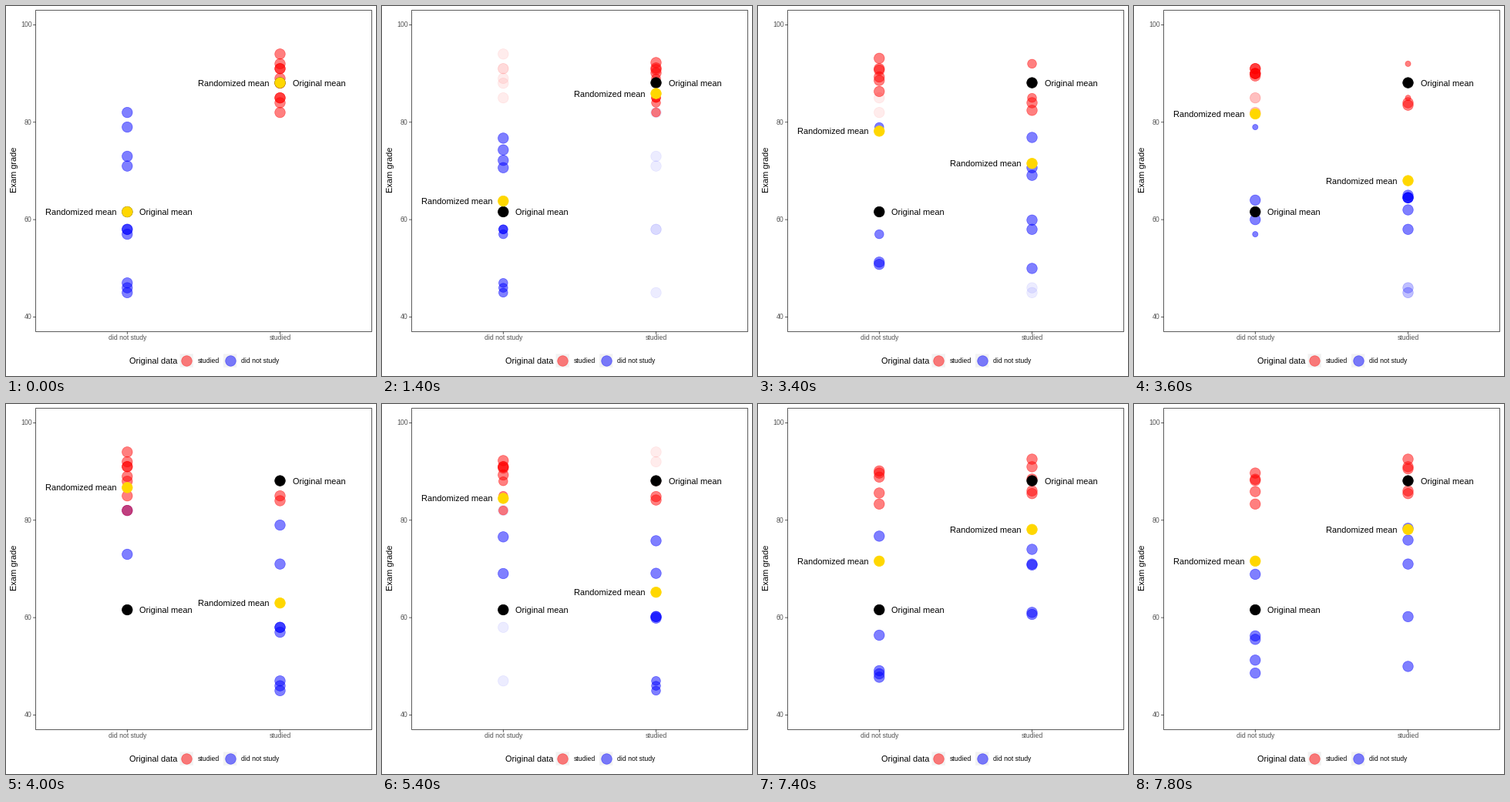
A matplotlib script that plays this animation: 480x480 px, repeating every 8 s.

```python
import math
import matplotlib as mpl
import matplotlib.pyplot as plt
from matplotlib.animation import FuncAnimation
from matplotlib.patches import Rectangle

mpl.rcParams.update({
    "font.family": "Liberation Sans",
    "text.hinting": "default",
    "text.hinting_factor": 8,
})

W = H = 480
LEFT, RIGHT, TOP, BOTTOM = 38.5, 474.5, 5.5, 422.5
COL_X = (157.3, 355.5)
RED, BLUE = (1, 0, 0), (0, 0, 1)
BLACK, GOLD = (0, 0, 0), (1, 215 / 255, 0)
SIZE, EDGE = 6, 0.71
HOLD, CYCLE = 7, 10

STUDIED = [82, 84, 85, 85, 88, 89, 91, 91, 92, 94]
NOT_STUDIED = [45, 46, 47, 57, 58, 58, 71, 73, 79, 82]
# Per shuffle, the students who keep their column: (studied, not studied).
KEPT = [
    (STUDIED, NOT_STUDIED),
    ([82, 84, 85, 92], [46, 47, 57, 79]),
    ([84, 85], [73, 82]),
    ([84, 85, 88, 92, 94], [45, 46, 47, 58, 82]),
    ([84, 85, 91, 92, 94], [46, 47, 57, 58, 73]),
]
GROUPS = ((0, RED), (0, BLUE), (1, RED), (1, BLUE))


def without(pool, taken):
    rest = list(pool)
    for grade in taken:
        rest.remove(grade)
    return rest


def arrange(k):
    """Grades per group; the sort direction flips so that points cross over."""
    red, blue = KEPT[k]
    groups = (without(STUDIED, red), blue, red, without(NOT_STUDIED, blue))
    return [sorted(g, reverse=k % 2 == 0) for g in groups]


STATES = [arrange(k) for k in range(len(KEPT))]


def y_px(grade):
    return 24.4 + (100 - grade) * 6.318


def diameter(size):
    return 0.75 * (size * 2.845 + 0.945)


def mean(state, col):
    grades = state[2 * col] + state[2 * col + 1]
    return sum(grades) / len(grades)


def mix(a, b, t):
    return a + (b - a) * t


def ease(t):
    return (1 - math.cos(math.pi * t)) / 2


def cloud(a, b, t):
    """Points as (order, x, y, size, colour, alpha) between two states."""
    pts = []
    for (col, color), old, new in zip(GROUPS, a, b):
        for i in range(max(len(old), len(new))):
            size, alpha = SIZE, 0.5
            if i < len(old) and i < len(new):
                grade = mix(old[i], new[i], t)
            elif i < len(old):
                grade, size = old[i], SIZE * (1 - t)
            else:
                grade, alpha = new[i], 0.5 * t
            pts.append((i, COL_X[col], y_px(grade), size, color, alpha))
    return sorted(pts, key=lambda p: p[0])


fig = plt.figure(figsize=(W / 72, H / 72), dpi=72, facecolor="white")
ax = fig.add_axes([0, 0, 1, 1])
ax.set_xlim(0, W)
ax.set_ylim(H, 0)
ax.axis("off")


def label(x, y, s, size=11, color="black", ha="left", va="baseline", **kw):
    return ax.text(x, y, s, fontsize=size, color=color, ha=ha, va=va, **kw)


def dots(pts, z):
    """One collection from (x, y, size, colour, alpha) tuples."""
    rgba = [(*p[3], p[4]) for p in pts]
    sc = ax.scatter([p[0] for p in pts], [p[1] for p in pts],
                    s=[diameter(p[2]) ** 2 for p in pts], facecolors=rgba,
                    edgecolors=rgba, linewidths=EDGE, zorder=z)
    sc.set_snap(False)
    return sc


def draw_frame():
    line = dict(color="#333333", lw=0.8, snap=False)
    ax.add_patch(Rectangle((LEFT, TOP), RIGHT - LEFT, BOTTOM - TOP,
                           fill=False, zorder=6, **line))
    for g in range(40, 101, 20):
        y = y_px(g)
        ax.plot([LEFT - 3, LEFT], [y, y], **line)
        label(33.5, y + 3, str(g), 8.8, "#4D4D4D", "right")
    for x, s in zip(COL_X, ("did not study", "studied")):
        ax.plot([x, x], [BOTTOM, BOTTOM + 3], **line)
        label(x, 433, s, 8.8, "#4D4D4D", "center")
    label(16, 212.5, "Exam grade", ha="right", va="center", rotation=90)


def draw_legend():
    label(160, 464, "Original data")
    for x, color, s in ((234.2, RED, "studied"),
                        (290.6, BLUE, "did not study")):
        ax.add_patch(Rectangle((x - 8.6, 451.4), 17.3, 17.3, fc="#F2F2F2",
                               ec="none", zorder=1, snap=False))
        dots([(x, 460, SIZE, color, 0.5)], 2)
        label(x + 14.4, 463, s, 8.8)


draw_frame()
draw_legend()
points = dots([], 3)
home = [y_px(mean(STATES[0], c)) for c in (0, 1)]
dots([(x, y, SIZE, BLACK, 1) for x, y in zip(COL_X, home)], 4)
mean_dots = dots([(x, y, SIZE, GOLD, 1) for x, y in zip(COL_X, home)], 5)
mean_labels = []
for x, y in zip(COL_X, home):
    label(x + 16, y + 4, "Original mean", zorder=5)
    mean_labels.append(label(x - 14, y + 4, "Randomized mean", ha="right",
                             zorder=5))


def update(frame):
    k, step = divmod(frame, CYCLE)
    t = ease(max(0, step - HOLD + 1) / (CYCLE - HOLD + 1))
    a, b = STATES[k], STATES[k + 1]

    pts = cloud(a, b, t)
    rgba = [(*p[4], p[5]) for p in pts]
    points.set_offsets([(p[1], p[2]) for p in pts])
    points.set_sizes([diameter(p[3]) ** 2 for p in pts])
    points.set_facecolors(rgba)
    points.set_edgecolors(rgba)

    ys = [y_px(mix(mean(a, c), mean(b, c), t)) for c in (0, 1)]
    mean_dots.set_offsets(list(zip(COL_X, ys)))
    for text, y in zip(mean_labels, ys):
        text.set_y(y + 4)
    return [points, mean_dots, *mean_labels]


anim = FuncAnimation(fig, update, frames=CYCLE * (len(STATES) - 1),
                     init_func=lambda: update(0), interval=200,
                     repeat=True, repeat_delay=0, blit=False)
plt.show()
```
